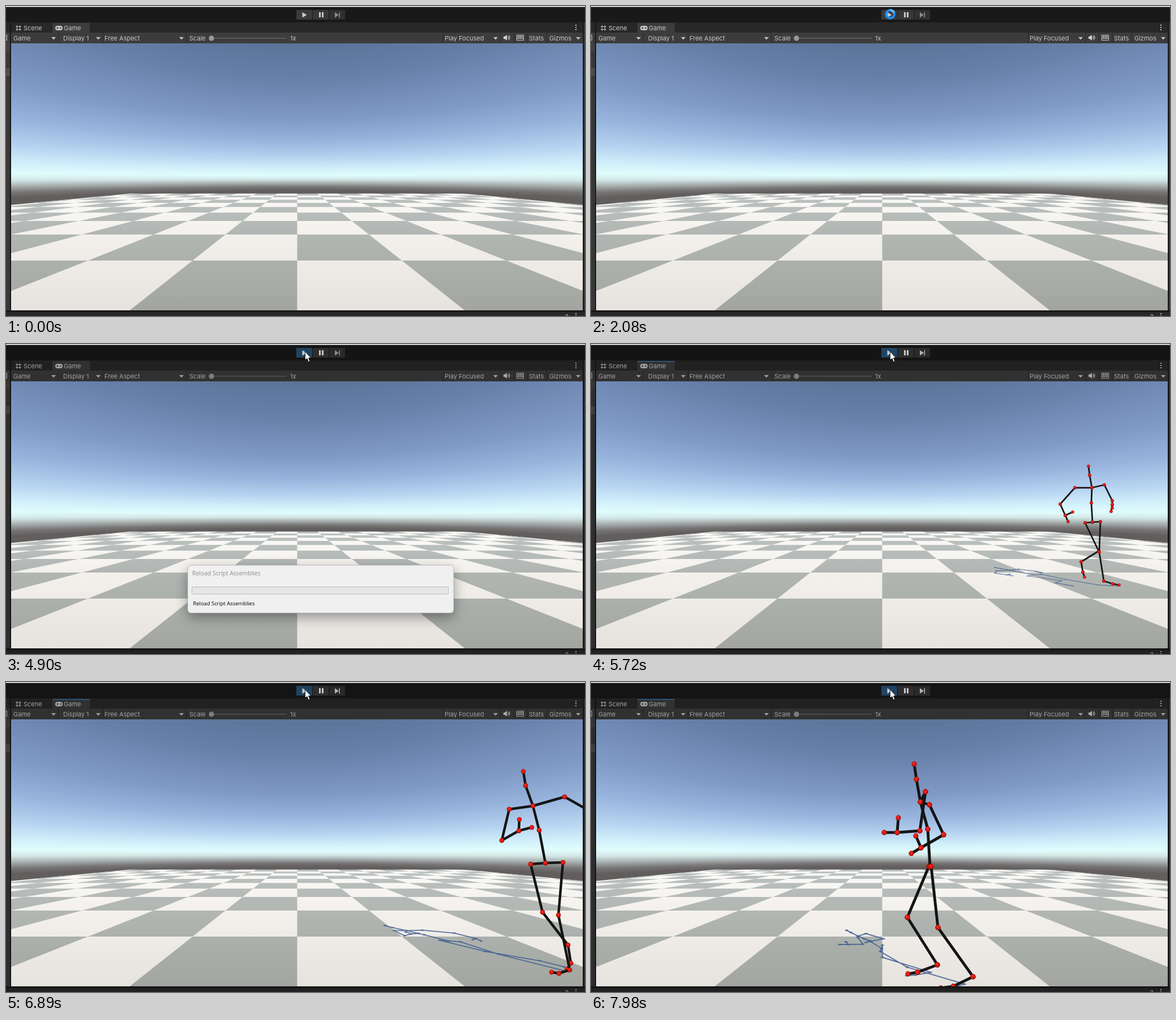
Recreate the animation shown at these times as an HTML page with a canvas. Size 1023 by 548 pixels, loop 8 s.

```html
<!DOCTYPE html>
<html lang="en">
<head>
<meta charset="utf-8">
<title>Game view</title>
<style>
html, body { margin: 0; width: 100%; height: 100%; overflow: hidden; background: #191919; }
canvas { display: block; width: 100%; height: 100%; }
</style>
</head>
<body>
<canvas id="stage" width="1023" height="548"></canvas>
<script>
const canvas = document.getElementById('stage');
const W = 1023, H = 548, LOOP = 8000, STEP = 68.4;
const VIEW = { x: 9, y: 66, w: 1010, h: 472 };
const HORIZON = 303.5, MID = 514.5, FOCAL = 409;
let c = canvas.getContext('2d');

// ---------- drawing helpers ----------
const rect = (x, y, w, h, col) => { c.fillStyle = col; c.fillRect(x, y, w, h); };
const poly = (pts, col) => {
  c.beginPath();
  pts.forEach(([x, y]) => c.lineTo(x, y));
  c.closePath();
  c.fillStyle = col;
  c.fill();
};
const dot = (x, y, r, col) => {
  c.beginPath();
  c.arc(x, y, r, 0, 7);
  c.fillStyle = col;
  c.fill();
};
const line = (x1, y1, x2, y2, col, w = 1) => {
  c.beginPath();
  c.moveTo(x1, y1);
  c.lineTo(x2, y2);
  c.strokeStyle = col;
  c.lineWidth = w;
  c.stroke();
};
const text = (s, x, y, col = '#c8c8c8', font = '11px Inter, sans-serif') => {
  c.font = font;
  c.fillStyle = col;
  c.fillText(s, x, y);
};
const gradient = (y1, y2, stops) => {
  const g = c.createLinearGradient(0, y1, 0, y2);
  stops.forEach(([y, col]) => g.addColorStop((y - y1) / (y2 - y1), col));
  return g;
};
const layer = paint => {
  const el = document.createElement('canvas'), old = c;
  el.width = W;
  el.height = H;
  c = el.getContext('2d');
  paint();
  c = old;
  return el;
};

// ---------- sky and checkered floor ----------
const rowY = n => HORIZON + 1 / (0.0068259 + 0.003124 * n);
const colX = (i, y) => MID + i * 1.262 * (y - HORIZON);

const scene = layer(() => {
  c.beginPath();
  c.rect(VIEW.x, VIEW.y, VIEW.w, VIEW.h);
  c.clip();
  const sky = [[66, '#5c7398'], [130, '#6780aa'], [200, '#7f9ac5'], [240, '#98b5de'], [268, '#b6d3f0'],
    [288, '#d2f0fb'], [299, '#e0fcfc'], [306, '#d3e8e7'], [313, '#a8afaf'], [320, '#777575'], [326, '#625e5d'], [360, '#625e5d']];
  // a fixed elevation bends away from the horizon towards the sides
  for (let x = VIEW.x; x < VIEW.x + VIEW.w; x += 2) {
    const k = Math.hypot(1, (x - MID) / FOCAL);
    const at = y => HORIZON + (y - HORIZON) * k;
    rect(x, VIEW.y, 2, 300, gradient(at(66), at(360), sky.map(([y, col]) => [at(y), col])));
  }
  const far = rowY(9.2), near = 575;
  c.beginPath();
  [[-8.3, far], [8.3, far], [8.3, near], [-8.3, near]].forEach(([i, y]) => c.lineTo(colX(i, y), y));
  c.clip();
  rect(0, far, W, 250, gradient(330, 540, [[330, '#fbfaf7'], [400, '#f4f1ed'], [540, '#e6e3de']]));
  const gray = gradient(330, 540, [[330, '#bcc2c1'], [400, '#b2b7b4'], [540, '#a2a59f']]);
  for (let n = -1; n < 10; n++) {
    const a = rowY(n), b = rowY(n + 1);
    for (let i = -9; i < 9; i++) {
      if ((i + n) % 2 === 0) poly([[colX(i, a), a], [colX(i + 1, a), a], [colX(i + 1, b), b], [colX(i, b), b]], gray);
    }
  }
});

// ---------- editor chrome ----------
const arrowDown = x => poly([[x - 4, 55], [x + 4, 55], [x, 59.5]], '#c4c4c4');
const kebab = (x, y) => [-4, 0, 4].forEach(d => rect(x - 1, y + d - 1, 2, 2, '#c4c4c4'));

const chrome = layer(() => {
  rect(0, 0, W, H, '#191919');
  rect(0, 0, W, 1, '#f6f6f6');
  rect(0, 1, W, 1, '#a0a0a0');
  rect(0, 29, W, 18, '#282828');
  rect(82, 30, 66, 17, '#3c3c3c');
  rect(0, 47, W, 19, '#3c3c3c');
  rect(0, 66, 8, 472, '#383838');
  rect(0, 66, 8, 14, '#424242');
  rect(0, 110, 8, 14, '#4d4d4d');
  rect(7, 29, 2, 511, '#191919');
  rect(1019, 29, 2, 511, '#191919');
  rect(1021, 29, 2, 511, '#383838');
  rect(0, 538, W, 3, '#191919');
  rect(0, 541, W, 7, '#282828');
  line(0, 51.5, 2, 51.5, '#c4c4c4');
  line(1.5, 51, 1.5, 61, '#c4c4c4');
  line(0, 60.5, 2, 60.5, '#c4c4c4');

  // tabs
  [19.5, 24.5].forEach(x => line(x, 34, x, 44, '#c4c4c4'));
  [36.5, 41.5].forEach(y => line(17, y, 27, y, '#c4c4c4'));
  text('Scene', 31, 43);
  c.beginPath();
  c.roundRect(87, 35, 13, 8, 4);
  c.fillStyle = '#c4c4c4';
  c.fill();
  line(89, 39, 93, 39, '#3c3c3c');
  line(91, 37, 91, 41, '#3c3c3c');
  dot(96.5, 39, 1.3, '#3c3c3c');
  text('Game', 102, 43);
  kebab(1007, 38);
  kebab(1007, 548);
  text('?', 988, 553);

  // view toolbar
  [92, 171, 318, 772, 873, 897, 921, 955].forEach(x => rect(x, 47, 1, 19, '#2a2a2a'));
  [84, 163, 310, 865, 1011].forEach(arrowDown);
  [['Game', 13], ['Display 1', 101], ['Free Aspect', 174], ['Scale', 324], ['1x', 502],
    ['Play Focused', 775], ['Stats', 924], ['Gizmos', 960]].forEach(([s, x]) => text(s, x, 61));
  line(363, 57, 496, 57, '#646464', 1.5);
  dot(363, 57, 4.7, '#999');
  poly([[879, 54], [881, 54], [885, 51], [885, 61], [881, 58], [879, 58]], '#d2d2d2');
  [2.5, 5].forEach(r => {
    c.beginPath();
    c.arc(885, 56, r, -0.9, 0.9);
    c.strokeStyle = '#d2d2d2';
    c.lineWidth = 1.2;
    c.stroke();
  });
  c.strokeStyle = '#c4c4c4';
  c.lineWidth = 1;
  c.strokeRect(902.5, 51.5, 12, 9);
  [54.5, 57.5].forEach(y => line(902, y, 915, y, '#c4c4c4'));
  [905.5, 908.5, 911.5].forEach(x => line(x, 52, x, 58, '#c4c4c4'));
});

function playButtons(playing, live) {
  rect(513, 7, 28, 17, playing ? '#1f4463' : '#3a3a3a');
  rect(542, 7, 28, 17, playing ? '#2e2e2e' : '#383838');
  rect(571, 7, 28, 17, playing ? '#2a2a2a' : '#303030');
  poly([[523.5, 11], [523.5, 20.5], [531.5, 15.7]], '#c8c8c8');
  rect(553, 11, 3, 9, '#c8c8c8');
  rect(558, 11, 3, 9, '#c8c8c8');
  const col = live ? '#b4b4b4' : '#8c8c8c';
  poly([[581, 11], [581, 20.5], [588, 15.7]], col);
  rect(588.5, 11, 1.5, 9.5, col);
}

// ---------- reload dialog ----------
function dialog() {
  c.save();
  c.shadowColor = 'rgba(0,0,0,.38)';
  c.shadowBlur = 22;
  c.shadowOffsetY = 8;
  c.beginPath();
  c.roundRect(321, 391, 470, 84.5, 6);
  c.fillStyle = '#f0f0f0';
  c.fill();
  c.restore();
  c.strokeStyle = '#a8a8a8';
  c.lineWidth = 0.7;
  c.stroke();
  text('Reload Script Assemblies', 329, 409, '#8c8c8c', '10.4px "Open Sans", sans-serif');
  rect(328, 429, 454, 13.5, '#bcbcbc');
  rect(329, 430, 452, 11.5, '#e6e6e6');
  text('Reload Script Assemblies', 330.5, 461.5, '#000', '9.4px "Open Sans", sans-serif');
}

// ---------- pointer ----------
function pointer(x, y) {
  c.save();
  c.translate(x, y);
  poly([[0, 0], [0, 15], [3.5, 12], [5.8, 18], [8.4, 17], [6, 11.2], [10.2, 11]], '#fff');
  c.strokeStyle = '#000';
  c.lineWidth = 0.8;
  c.stroke();
  c.restore();
}
function spinner(k) {
  const ring = (a, b, col) => {
    c.beginPath();
    c.arc(528.5, 14.5, 7.2, a, b);
    c.strokeStyle = col;
    c.lineWidth = 4.2;
    c.stroke();
  };
  ring(0, 7, '#1c8cec');
  ring(k * 0.5, k * 0.5 + 1.3, '#5cb4f6');
}

// ---------- walking figure ----------
// Smooth curve through rows of [time, ...values].
function spline(keys, t) {
  const last = keys.length - 1;
  let i = 0;
  while (i < last - 1 && t > keys[i + 1][0]) i++;
  const a = keys[i], b = keys[i + 1], d = b[0] - a[0];
  const u = Math.min(1, Math.max(0, (t - a[0]) / d));
  const slope = (j, n) => {
    const p = keys[Math.max(0, j - 1)], q = keys[Math.min(last, j + 1)];
    return (q[n] - p[n]) / (q[0] - p[0]) * d;
  };
  const u2 = u * u, u3 = u2 * u;
  return a.slice(1).map((v, n) => (2 * u3 - 3 * u2 + 1) * v + (3 * u2 - 2 * u3) * b[n + 1]
    + (u3 - 2 * u2 + u) * slope(i, n + 1) + (u3 - u2) * slope(i + 1, n + 1));
}

// step, pelvis x, pelvis y, floor y, depth lead of the right side
const path = [
  [-2, 808, 313, 411, 2], [2, 886, 315, 430, 2], [6, 937, 316, 449, 1], [11, 973, 319, 474, 0],
  [15, 976, 320, 493, -2], [19, 953, 320, 510, -3], [26, 829, 332, 527, -5], [35, 599, 327, 532, -11]
];

// Joints: head, neck, chest, spine, pelvis; then for right and left:
// shoulder, elbow, wrist, fingers, thumb, hip, knee, ankle, ball, toe
function pose(step, trunk, right, left) {
  const [x, y, floor] = spline(path, step);
  return [...trunk, ...right, ...left].map((v, i) => (v - (i % 2 ? y : x)) / (floor - HORIZON));
}
const mix = (a, b, u) => a.map((v, i) => v + (b[i] - v) * u);
function swapLegs(p) {
  const q = p.slice();
  for (let i = 22; i < 30; i++) {
    const hr = 20 + i % 2, hl = hr + 20;
    q[i] = p[hr] + p[i + 20] - p[hl];
    q[i + 20] = p[hl] + p[i] - p[hr];
  }
  return q;
}

const away = pose(2,
  [879, 216, 881, 232, 885, 254, 884, 281, 886, 315],
  [855, 254, 829, 283, 838, 303, 843, 314, 851, 297, 873, 316, 897, 366, 866, 385, 869, 403, 872, 412],
  [907, 249, 921, 277, 921, 284, 919, 296, 921, 290, 900, 314, 898, 368, 906, 419, 922, 424, 933, 426]);
const turned = pose(19,
  [914, 158, 918, 183, 931, 219, 942, 262, 953, 320],
  [889, 225, 876, 280, 906, 263, 929, 257, 907, 243, 927, 322, 948, 407, 993, 465, 998, 497, 991, 508],
  [987, 203, 1045, 236, 1050, 290, 1040, 312, 1032, 300, 984, 319, 976, 412, 996, 509, 977, 515, 964, 513]);
const stride = pose(26,
  [788, 155, 793, 181, 806, 220, 820, 268, 829, 332],
  [791, 224, 804, 276, 767, 292, 760, 308, 765, 280, 810, 332, 791, 425, 825, 522, 790, 531, 772, 533],
  [849, 202, 883, 270, 806, 278, 765, 279, 808, 252, 851, 331, 877, 438, 956, 491, 943, 528, 937, 545]);
const side = pose(35,
  [571, 145, 575, 172, 582, 212, 595, 260, 599, 327],
  [598, 217, 623, 270, 583, 293, 566, 303, 574, 272, 597, 326, 559, 416, 612, 500, 577, 513, 560, 516],
  [591, 194, 581, 263, 541, 266, 518, 266, 543, 240, 601, 326, 613, 434, 675, 521, 640, 538, 618, 541]);

const walk = [
  [-2, ...mix(away, swapLegs(away), 0.3)],
  [2, ...away],
  [10.5, ...swapLegs(mix(away, turned, 0.5))],
  [19, ...turned],
  [26, ...stride],
  [31.5, ...mix(swapLegs(stride), side, 0.35)],
  [35, ...side]
];

const limb = b => [[b, 2], [b + 1, b], [b + 2, b + 1], [b + 3, b + 2], [b + 4, b + 2],
  [b + 5, 4], [b + 6, b + 5], [b + 7, b + 6], [b + 8, b + 7], [b + 9, b + 8]];
const bones = [...limb(5), [4, 4], [3, 4], [2, 3], [1, 2], [0, 1], ...limb(15)];

function figure(step) {
  const [px, py, floor, lead] = spline(path, step);
  const p = spline(walk, step), size = floor - HORIZON;
  const joints = Array.from({ length: 25 }, (_, j) => [px + p[2 * j] * size, py + p[2 * j + 1] * size]);

  // sunlight throws each joint left and away along the floor
  const cast = joints.map(([x, y], j) => {
    const g = floor + (j < 5 ? 0 : j < 15 ? lead : -lead);
    const up = Math.max(0, g - y), z = 1 + 0.727 * up / FOCAL;
    return [MID + (x - MID - 0.42 * up) / z, HORIZON + (g - HORIZON) / z];
  });
  c.lineCap = 'round';
  c.beginPath();
  bones.forEach(([a, b]) => { c.moveTo(...cast[a]); c.lineTo(...cast[b]); });
  c.strokeStyle = 'rgba(62,92,142,.82)';
  c.lineWidth = size / 115;
  c.stroke();
  cast.forEach(([x, y]) => {
    c.beginPath();
    c.ellipse(x, y, size / 70, size / 150, 0, 0, 7);
    c.fillStyle = 'rgba(62,92,142,.6)';
    c.fill();
  });

  const r = size / 55 + 0.5;
  bones.forEach(([a, b]) => {
    const [x, y] = joints[a];
    line(x, y, ...joints[b], '#151515', size / 46);
    [a, b].forEach(j => {
      const [jx, jy] = joints[j];
      const shade = c.createRadialGradient(jx - r * 0.2, jy - r * 0.4, 0, jx, jy, r);
      shade.addColorStop(0, '#f8301c');
      shade.addColorStop(0.6, '#dc1a12');
      shade.addColorStop(1, '#9c0c0a');
      dot(jx, jy, r, shade);
    });
  });
  c.lineCap = 'butt';
}

// ---------- timeline ----------
function draw(t) {
  const k = Math.floor((t - 512) / STEP);
  const playing = t >= 2500, running = t >= 5060;
  c.drawImage(chrome, 0, 0);
  if (playing) rect(0, 2, W, H, 'rgba(0,0,0,.19)');
  if (running) rect(82, 30, 66, 1.5, '#2c5d87');
  playButtons(playing, t >= 5580);
  c.drawImage(scene, 0, 0);

  if (t >= 5320) {
    c.save();
    c.beginPath();
    c.rect(VIEW.x, VIEW.y, VIEW.w, VIEW.h);
    c.clip();
    figure(t < 5580 ? -2 : k - 74);
    c.restore();
  }
  if (t >= 2900 && !running) dialog();

  if (t >= 1330 && t < 4900) spinner(k);
  else if (t >= 520) {
    const u = Math.min(1, k / 10), s = u * u * (3 - 2 * u);
    pointer(957 + (528.5 - 957) * s, 537 + (13.5 - 537) * s);
  }
}

const start = performance.now();
function tick() {
  draw((performance.now() - start) % LOOP);
  requestAnimationFrame(tick);
}
tick();
</script>
</body>
</html>
```
